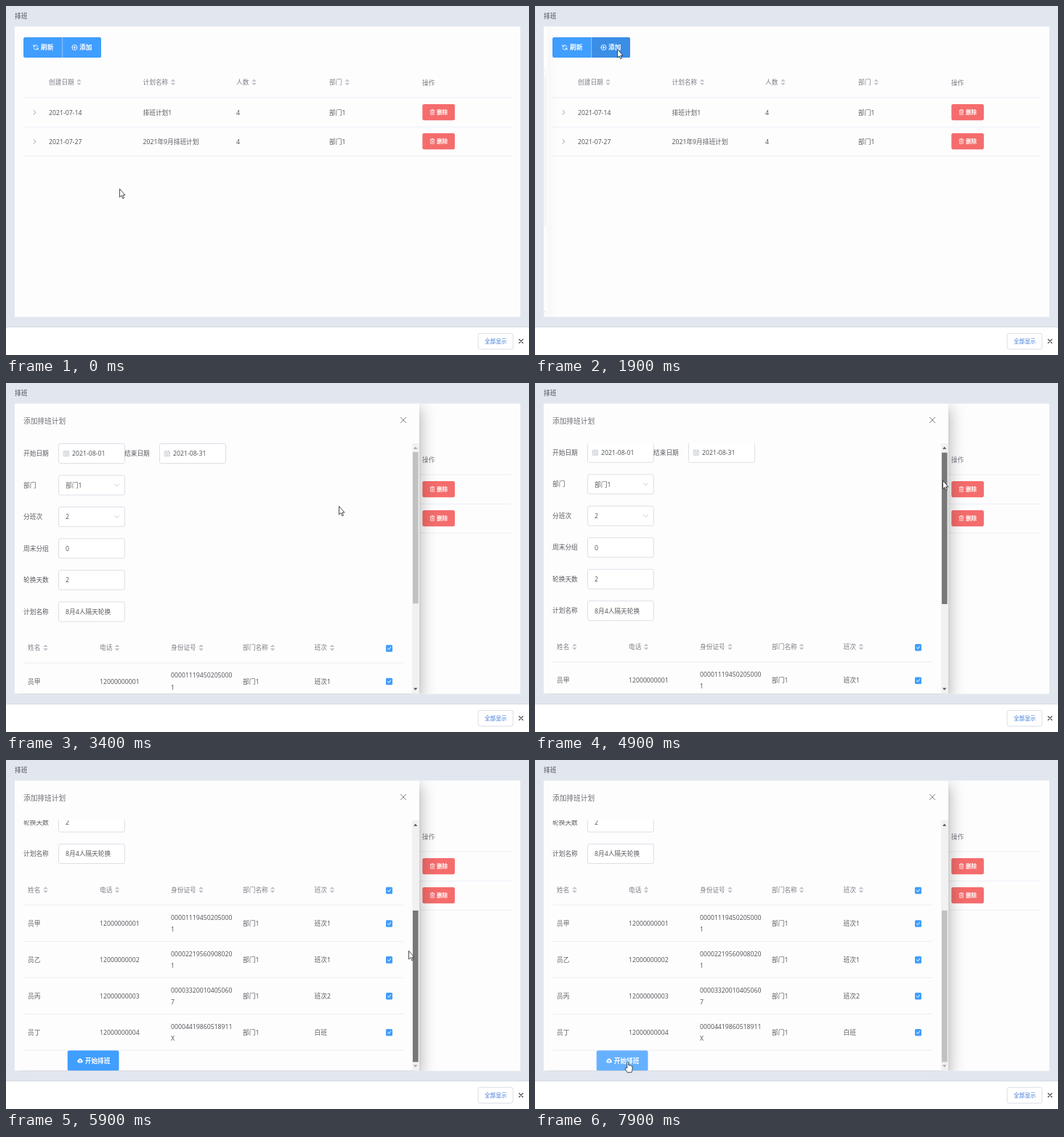
Write an HTML page that moves like this. It is 720 by 480 pixels and loops after 8 s.

```html
<!DOCTYPE html>
<html lang="zh-CN">
<head>
<meta charset="utf-8">
<style>
html, body { margin: 0; width: 100%; height: 100%; overflow: hidden; }
svg { display: block; font: 8.7px "Noto Sans", "Noto Sans CJK SC", "Noto Sans CJK", sans-serif; }
.line { fill: none; stroke-linecap: round; stroke-linejoin: round; }
</style>
</head>
<body>
<svg id="stage" width="720" height="480" viewBox="0 0 720 480"></svg>
<script>
const BODY = '#595b5f', HEAD = '#7c7f85', BLUE = '#409eff', LIGHT_BLUE = '#66b1ff';
const DRAG_FROM = 4800, DRAG_TO = 5900, TRAVEL = 112, MAX_SCROLL = 185.5;

// Drawing helpers; y of a text is its vertical centre
const text = (x, y, s, fill = BODY, size = 8.7, weight = 400) =>
  `<text x="${x}" y="${y + size * 0.36}" fill="${fill}" font-size="${size}" font-weight="${weight}">${s}</text>`;
const rect = (x, y, w, h, fill, r = 0, more = '') =>
  `<rect x="${x}" y="${y}" width="${w}" height="${h}" rx="${r}" fill="${fill}" ${more}/>`;
const line = (x, y, d, color, width = 1) =>
  `<path class="line" transform="translate(${x} ${y})" d="${d}" stroke="${color}" stroke-width="${width}"/>`;
const shape = (x, y, d, fill, id = '') =>
  `<path id="${id}" transform="translate(${x} ${y})" d="${d}" fill="${fill}"/>`;
const rule = (x1, x2, y) => rect(x1, y - 0.5, x2 - x1, 1, '#ebeef5');
const cross = (x, y, r, color, width) => line(x, y, `M${-r} ${-r}L${r} ${r}M${r} ${-r}L${-r} ${r}`, color, width);
const sorter = (x, y) => shape(x, y, 'M-3.3 -.9L0 -4.3 3.3 -.9ZM-3.3 1L0 4.4 3.3 1Z', '#c0c4cc');
const heading = (x, y, s, sortX) => text(x, y, s, HEAD, 8.7, 500) + (sortX ? sorter(sortX, y) : '');
const check = (x, y) => rect(x - 4.5, y - 4.8, 9, 9.6, BLUE, 1.5) + line(x, y, 'M-2 0L-.5 1.7 2.2 -1.7', '#fff');

function planRow(y, date, name) {
  return line(39.5, y, 'M-1.5 -2.8L1.5 0 -1.5 2.8', '#909399', 0.9) +
    text(59, y + 0.4, date) + text(188.5, y + 0.4, name) + text(317, y + 0.4, '4') + text(445, y + 0.4, '部门1') +
    rect(573.3, y - 11.3, 44.6, 22.3, '#f56c6c', 2.3) +
    line(587, y - 0.3, 'M-3 -2.2H3M-1 -2.2V-3.6H1V-2.2M-2.3 -2.2V3.4H2.3V-2.2M-.7 -.4V1.7M.7 -.4V1.7', '#fff', 0.7) +
    text(593, y - 0.4, '删除', '#fff', 7.6, 700) + rule(24, 696, y + 20);
}

function field(x, y, label, value, kind) {
  const left = x + 48.5;
  let out = text(x, y, label) +
    rect(left, y - 13.5, 91, 27, '#fff', 2.5, 'stroke="#dcdfe6"') +
    text(left + (kind == 'date' ? 18.5 : 9.5), y + 0.3, value);
  if (kind == 'date')
    out += line(left + 10.5, y, 'M-3.4 -3H3.4V3.5H-3.4ZM-3.4 -1H3.4M-1.7 -4V-2.5M1.7 -4V-2.5M-2 .6H2M-2 2H2', '#c0c4cc', 0.8);
  if (kind == 'select')
    out += line(left + 80, y, 'M-3 -1.5L0 1.5 3 -1.5', '#c0c4cc', 0.9);
  return out;
}

const staffRow = ([name, phone, id, end, shift], i) => {
  const y = 410.5 + i * 49.9;
  return text(30, y, name) + text(129, y, phone) + text(227, y - 8.3, id) + text(227, y + 8, end) +
    text(326, y, '部门1') + text(424.5, y, shift) + check(527.5, y) + rule(24, 547, y + 24.4);
};

const page =
  rect(0, 0, 720, 480, '#e2e7ef') + text(12, 14, '排班', '#4c4e52') + rect(12, 28.3, 696, 399.3, '#fefdfe') +
  rect(24, 43, 107, 28, BLUE, 2.5) +
  '<path id="add" d="M78 43H128.5Q131 43 131 45.5V68.5Q131 71 128.5 71H78Z"/>' +
  rect(77.3, 43, 0.8, 28, '#a6d2ff') +
  line(41, 57, 'M-2.9 -1.2A3.1 3.1 0 0 1 2.9 -1M2.9 1.2A3.1 3.1 0 0 1 -2.9 1M-3 -3.3V-1.1H-1M3 3.3V1.1H1', '#fff', 0.9) +
  text(48, 57, '刷新', '#fff', 8.7, 700) +
  line(94.5, 57, 'M-3.6 0A3.6 3.6 0 1 1 3.6 0A3.6 3.6 0 1 1 -3.6 0M-1.7 0H1.7M0 -1.7V1.7', '#fff', 0.9) +
  text(101, 57, '添加', '#fff', 8.7, 700) +
  heading(59, 104.7, '创建日期', 100.5) + heading(188.5, 104.7, '计划名称', 230) +
  heading(317, 104.7, '人数', 341.5) + heading(445, 104.7, '部门', 469.8) + heading(573, 105.7, '操作') +
  rule(24, 696, 126) + planRow(146.3, '2021-07-14', '排班计划1') + planRow(186.3, '2021-07-27', '2021年9月排班计划');

const form =
  field(24, 97, '开始日期', '2021-08-01', 'date') + field(163, 97, '结束日期', '2021-08-31', 'date') +
  field(24, 140.5, '部门', '部门1', 'select') + field(24, 184, '分班次', '2', 'select') +
  field(24, 227.5, '周末分组', '0') + field(24, 271, '轮换天数', '2') + field(24, 314.5, '计划名称', '8月4人隔天轮换') +
  heading(30, 364, '姓名', 54.5) + heading(129, 364, '电话', 153) + heading(227, 364, '身份证号', 268.5) +
  heading(326, 364, '部门名称', 367) + heading(424.5, 364, '班次', 449) + check(527.5, 365) + rule(24, 547, 385) +
  [['员甲', '12000000001', '00001119450205000', '1', '班次1'],
   ['员乙', '12000000002', '00002219560908020', '1', '班次1'],
   ['员丙', '12000000003', '00003320010405060', '7', '班次2'],
   ['员丁', '12000000004', '00004419860518911', 'X', '白班']].map(staffRow).join('') +
  rect(84.7, 585, 70.8, 28, BLUE, 2.5, 'id="start"') +
  shape(102, 599, 'M-2.2 3A2.1 2.1 0 0 1 -2.5 -1A2.6 2.6 0 0 1 2.5 -1A2.1 2.1 0 0 1 2.2 3Z', '#fff') +
  line(102, 599, 'M0 2V-.7M-1.2 .4L0 -.8 1.2 .4', BLUE, 0.8) +
  text(108.7, 599, '开始排班', '#fff', 8.7, 600);

const shadow = (grow, dy, blur, alpha) =>
  rect(12 - grow, 28 - grow + dy, 557 + 2 * grow, 399 + 2 * grow, '#000', 0, `opacity="${alpha}" style="filter:blur(${blur}px)"`);

const drawer =
  shadow(2, 12, 9.4, 0.14) + shadow(4, 5, 11.7, 0.12) + shadow(-4, 6, 4, 0.2) +
  rect(12, 28.3, 557, 399.3, '#fefdfe') +
  text(24, 52.3, '添加排班计划', '#6a6d72', 9.7) + cross(547, 51, 3.7, '#72767b', 0.9) +
  `<g clip-path="url(#body)"><g id="form">${form}</g></g>` +
  rect(559, 83, 10, 344.6, '#f1f1f1') + rect(560, 95, 7.6, 208.3, '#c1c1c1', 0, 'id="thumb"') +
  shape(563.7, 89.3, 'M-2.7 1.5L0 -1.5 2.7 1.5Z', '#505050', 'up') +
  shape(563.7, 421, 'M-2.7 -1.5L0 1.5 2.7 -1.5Z', '#505050', 'down');

const footer =
  rect(0, 441, 720, 39, '#fff') + rect(0, 441, 720, 1, '#d3d9e0') +
  rect(650, 450.3, 48, 21.7, '#fff', 2.5, 'stroke="#d8dbe0" stroke-width=".9"') +
  text(659, 461.3, '全部显示', '#3b78d8', 7.6) + cross(709, 461, 2.6, '#55595e', 1.4);

const cursor =
  `<g id="cursor" stroke="#222" stroke-width=".8" stroke-linejoin="round" fill="#fff">
    <path id="arrow" d="M.5 .5V12L3 9.7 4.8 13.8 6.5 13 4.7 9.1H8Z"/>
    <path id="hand" d="M-.8 9V.6Q.2 -1 1.3 .6V5Q2.4 4 3.2 5.3Q4.3 4.5 5 5.8Q6.4 5.3 6.6 7V10.5L5.4 14.7H-.4L-3.4 9.8Q-3.4 8 -1.9 8.4Z"/>
  </g>`;

const stage = document.getElementById('stage');
stage.innerHTML =
  `<clipPath id="panel">${rect(12, 28.3, 696, 399.3)}</clipPath><clipPath id="body">${rect(12, 83, 547, 344.6)}</clipPath>` +
  page + `<g clip-path="url(#panel)"><g id="drawer">${drawer}</g></g>` + footer + cursor;

const $ = id => document.getElementById(id);
const set = (id, name, value) => $(id).setAttribute(name, value);
const clamp = (v, lo = 0, hi = 1) => Math.min(hi, Math.max(lo, v));
const smooth = p => p * p * (3 - 2 * p);

// Pointer stops: time, x, y, and whether the way there is eased
const stops = [
  [0, 156, 251, 1], [200, 156, 251, 1], [1250, 113, 59, 1], [2500, 113, 59, 1], [3400, 458, 169, 1],
  [4300, 561, 133, 1], [4800, 561, 133, 1], [4900, 561, 133.6, 0], [5500, 557, 224.7, 0], [5900, 554, 262, 0],
  [6450, 554, 262, 1], [7800, 127.5, 415, 1], [8000, 127.5, 415, 1]
];

function pointer(t) {
  const i = Math.max(1, stops.findIndex(s => s[0] >= t));
  const a = stops[i - 1], b = stops[i];
  const p = (t - a[0]) / (b[0] - a[0]), e = b[3] ? smooth(p) : p;
  return [a[1] + (b[1] - a[1]) * e, a[2] + (b[2] - a[2]) * e];
}

function draw(t) {
  const [x, y] = pointer(t);
  const overAdd = y < 71 && x > 78 && x < 131;
  const overStart = t > DRAG_TO && y > 399 && x > 85 && x < 155;
  set('add', 'fill', t >= 1700 ? '#3a8ee6' : overAdd ? LIGHT_BLUE : BLUE);
  set('start', 'fill', overStart ? LIGHT_BLUE : BLUE);

  const slide = 1 - (1 - clamp((t - 1900) / 300)) ** 3;
  set('drawer', 'transform', `translate(${557 * (slide - 1)} 0)`);
  set('drawer', 'opacity', clamp((t - 1860) / 300));

  const drag = clamp(pointer(clamp(t, DRAG_FROM, DRAG_TO))[1] - 133, 0, TRAVEL);
  set('form', 'transform', `translate(0 ${-drag / TRAVEL * MAX_SCROLL})`);
  set('thumb', 'y', 95 + drag);
  set('thumb', 'fill', t >= 4700 && t < 6450 ? '#787878' : t >= 4250 && t < 4700 ? '#a8a8a8' : '#c1c1c1');
  set('up', 'fill', drag > 0 ? '#505050' : '#a3a3a3');
  set('down', 'fill', drag < TRAVEL ? '#505050' : '#a3a3a3');

  set('cursor', 'transform', `translate(${x} ${y})`);
  set('arrow', 'visibility', overStart ? 'hidden' : 'visible');
  set('hand', 'visibility', overStart ? 'visible' : 'hidden');
}

const begin = performance.now();
function tick() {
  draw((performance.now() - begin) % 8000);
  requestAnimationFrame(tick);
}
tick();
</script>
</body>
</html>
```
